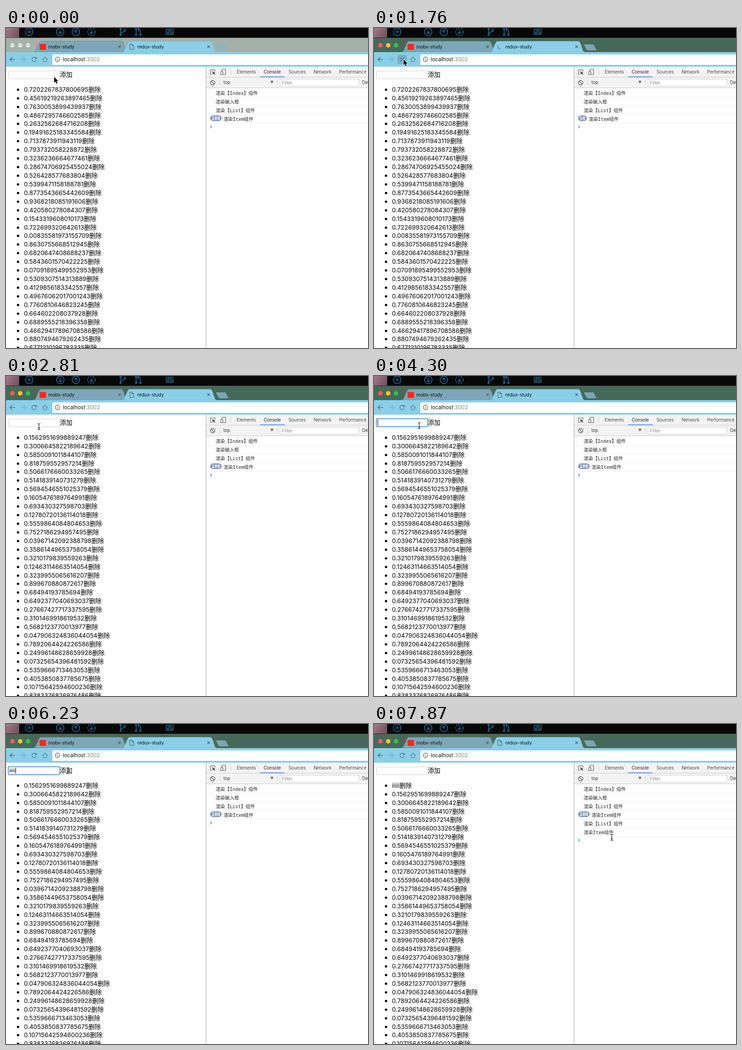
Write an HTML page with a canvas that moves like this. It is 797x703 px and loops after 8 s.

```html
<!DOCTYPE html>
<html lang="zh-CN">
<head>
<meta charset="utf-8">
<title>redux-study</title>
<style>
html, body { margin: 0; width: 100%; height: 100%; overflow: hidden; background: #fff; }
canvas { display: block; width: 797px; height: 703px; }
</style>
</head>
<body>
<canvas id="stage" width="797" height="703"></canvas>
<script>
const c = document.getElementById('stage').getContext('2d');
const LOOP = 8000, TICK = 146.5;
const ACTIVE = 570, PRESS = 1620, RELOAD = 1760, LOADED = 1910;
const FOCUS = 3260, TYPE = 4600, TYPED = 5190, ADD = 6530;
const CJK = '"Noto Sans CJK SC", "Noto Sans CJK", sans-serif';
const UI = 'Inter, ' + CJK;
const MONO = '"DejaVu Sans Mono", "Noto Sans CJK SC", "Noto Sans CJK", monospace';

// seeded stand-in for Math.random with full precision
function randomList(seed) {
  const word = () => {
    seed = seed + 0x6d2b79f5 | 0;
    let n = Math.imul(seed ^ seed >>> 15, seed | 1);
    n ^= n + Math.imul(n ^ n >>> 7, n | 61);
    return (n ^ n >>> 14) >>> 0;
  };
  return Array.from({ length: 31 }, () => String(word() / 2 ** 32 + word() / 2 ** 64));
}
const before = randomList(3), after = randomList(8);

// the pointer rests between legs; sag bends a leg downwards
const legs = [
  { at: 150, steps: 2, to: [95, 101] },
  { at: 870, steps: 4, to: [65, 69] },
  { at: 2360, steps: 4, to: [72, 111] },
  { at: 3550, steps: 2, to: [99, 109] },
  { at: 5640, steps: 5, to: [136, 102], sag: 10 },
  { at: 6680, steps: 3, to: [356, 178] },
  { at: 7270, steps: 5, to: [523, 249], sag: 33 }
];

// number of picture steps taken since a moment
const ticks = (t, from, max) => t < from ? 0 : Math.min(max, 1 + Math.floor((t - from) / TICK));
const during = (t, from, to) => t >= from && t < to;

function rect(x, y, w, h, color, r = 0) {
  c.beginPath();
  c.roundRect(x, y, w, h, r);
  c.fillStyle = color;
  c.fill();
}
function box(x, y, w, h, color, r = 0, width = 1) {
  c.beginPath();
  c.roundRect(x, y, w, h, r);
  c.strokeStyle = color;
  c.lineWidth = width;
  c.stroke();
}
function fill(d, color) {
  c.fillStyle = color;
  c.fill(new Path2D(d));
}
function stroke(d, color, width = 1.2) {
  c.strokeStyle = color;
  c.lineWidth = width;
  c.stroke(new Path2D(d));
}
function dot(x, y, r, color) {
  rect(x - r, y - r, 2 * r, 2 * r, color, r);
}
function ring(x, y, r, color, width = 1.2, from = 0, to = Math.PI * 2) {
  c.beginPath();
  c.arc(x, y, r, from, to);
  c.strokeStyle = color;
  c.lineWidth = width;
  c.stroke();
}
function cross(x, y, r, color, width) {
  stroke(`M${x - r} ${y - r}l${2 * r} ${2 * r}M${x + r} ${y - r}l${-2 * r} ${2 * r}`, color, width);
}
function text(s, x, y, size, color = '#000', family = UI, weight = 400) {
  c.font = `${weight} ${size}px ${family}`;
  c.fillStyle = color;
  c.fillText(s, x, y);
  return x + c.measureText(s).width;
}

function desktop() {
  const blue = '#1a8fd8', dim = '#2f6c8e';
  rect(0, 0, 797, 22, '#080808');
  const g = c.createLinearGradient(0, 0, 30, 20);
  g.addColorStop(0, '#a57b8b');
  g.addColorStop(1, '#6d4c58');
  rect(0, 0, 29, 21, g);

  ring(51, 8.5, 8.3, blue);
  stroke('M47 8.5h8M51 4.5v8', blue);
  ['down', 'up', 'fetch'].forEach((kind, i) => {
    const x = 119.5 + i * 34.3, dir = kind === 'up' ? -1 : 1;
    c.setLineDash(kind === 'fetch' ? [4, 2] : []);
    ring(x, 8.5, 8.3, blue);
    c.setLineDash([]);
    stroke(`M${x} ${8.5 - 4 * dir}v${8 * dir}m-3 ${-3 * dir}l3 ${3 * dir} 3 ${-3 * dir}`, blue);
  });
  for (const x of [252.5, 286.5]) {
    ring(x, 2, 1.8, blue);
    ring(x, 15, 1.8, blue);
    stroke(`M${x} 4v9`, blue);
  }
  stroke('M252.5 12c0-3 8-2 8-6M296 13V7q0-4-5-4M293 .5l-2.5 2.5 2.5 2.5', blue);
  ring(261.5, 5, 1.8, blue);
  ring(296, 15, 1.8, blue);
  rect(352, 2, 17, 13, '#12232e');
  box(352.5, 2.5, 16, 12, dim);
  for (let i = -1; i < 2; i++) ring(360.5 + 4 * i, i ? 11 : 6, 2, dim, 1);
}

function tab(x, right, color, edge) {
  const d = `M${x} 53C${x + 6} 53 ${x + 10} 29 ${x + 16} 29H${right - 12}C${right - 6} 29 ${right - 4} 53 ${right + 2} 53Z`;
  fill(d, color);
  stroke(d, edge, .6);
}

function tabs(t) {
  const active = t >= ACTIVE;
  rect(0, 21.5, 797, 32, active ? '#476959' : '#a2b2aa');
  ['#fc5753', '#fdbc2f', '#2ac840'].forEach((color, i) =>
    dot(14 + i * 17.2, 38, 5.1, active ? color : '#dce2df'));
  tab(61, 266, '#7da6b8', '#5a7d87');
  tab(256, 462, '#8acfe7', '#6d9dab');
  fill('M462 36h21l7 13h-21z', active ? '#7da6b3' : '#92b3bc');
  rect(0, 53, 797, 32, '#8acfe7');
  rect(74, 35, 14, 13, '#f5291b');
  text('mobx-study', 93, 45, 10.2, '#111');
  text('redux-study', 289, 45, 10.2, '#111');
  cross(250, 41, 2.7, '#40565f', 1.2);
  cross(446, 41, 2.7, '#33505b', 1.2);
  if (during(t, RELOAD, LOADED)) ring(278, 41, 5, '#3f7fd4', 1.7, 1.4, 3.6);
  else stroke('M272.5 35.5h5l3.5 3.5v8h-8.5zM277.5 35.5v3.5h3.5', '#3d525b', 1);
}

function toolbar(t) {
  const ink = '#557682';
  stroke('M20 69H9M14 63.5l-5.5 5.5 5.5 5.5', ink, 1.4);
  stroke('M32 69h11M38 63.5l5.5 5.5-5.5 5.5', '#74b5cc', 1.4);
  if (during(t, PRESS, LOADED)) rect(52, 59, 20, 20, '#76b0c4', 2);
  if (during(t, RELOAD, legs[2].at)) cross(62, 69, 4.6, ink, 1.4);
  else {
    ring(62, 69, 4.9, ink, 1.4, .3, 5.5);
    fill('M67.7 63v5h-5z', ink);
  }
  stroke('M80.5 69.5l5.5-5.5 5.5 5.5M82.5 68.5v5.5h7v-5.5', ink, 1.1);

  rect(102, 58, 710, 23, '#fff', 2);
  ring(113.5, 69, 5.1, '#555', 1.1);
  stroke('M113.5 66v1.2M113.5 68.2v4', '#555');
  const x = text('localhost', 125, 73, 11.6, '#111');
  text(':3002', x, 73, 11.6, '#808080');
}

function input(t) {
  if (!during(t, FOCUS, ADD)) {
    box(5.5, 94.5, 113, 17, '#d2d2d2');
    return;
  }
  box(5, 93.5, 113.5, 18, '#b9d9f8', 2.5, 3);
  box(5.5, 94, 112.5, 17, '#5b9fe8', 1, 1.6);
  const end = text('i'.repeat(ticks(t, TYPE, 5)), 7.5, 106, 10.8);
  const lastKey = t < TYPE ? FOCUS : Math.min(t, TYPED);
  if ((t - lastKey) % 1040 < 440) rect(Math.round(end + .3), 96, 1, 13, '#000');
}

function page(t) {
  rect(0, 85, 441, 618, '#fff');
  input(t);
  text('添加', 118.5, 107, 13.8, '#000', CJK);
  const items = t < LOADED ? before : t < ADD ? after : ['iiiii', ...after];
  items.forEach((s, i) => {
    const y = Math.round(139.8 + i * 18.92);
    dot(26.5, y - 4.5, 2.6, '#000');
    const x = text(s, 39.5, y, 13.4);
    text('删除', x, y, 13.8, '#000', CJK);
  });
}

function devtoolsBars() {
  const ink = '#5a5a5a', line = '#ccc';
  rect(441, 85, 356, 46, '#f3f3f3');
  rect(441, 107.5, 356, 1, line);
  rect(441, 131, 356, 1, line);

  stroke('M454 101.5h-3.5v-9.5h9.5v3.5', ink, 1.1);
  fill('M454 95l7 3-2.7 1 2.7 3-1 1-2.8-3-1.2 2.5z', '#444');
  box(475.5, 90.5, 8, 12, ink, 1, 1.2);
  rect(472, 95, 6, 8, '#f3f3f3');
  box(472.5, 95.5, 5, 7, ink, 1, 1.2);
  rect(494.5, 90, 1, 13, line);
  let x = 508;
  for (const name of ['Elements', 'Console', 'Sources', 'Network', 'Performance']) {
    const selected = name === 'Console';
    const end = text(name, x, 100, 9.8, selected ? '#222' : '#484848');
    if (selected) rect(x - 8, 106.5, end - x + 16, 1.7, '#4a8af4');
    x = end + 17;
  }

  ring(455, 120, 4.8, ink, 1.4);
  stroke('M451.6 116.6l6.8 6.8', ink, 1.4);
  rect(470.5, 113, 1, 13, line);
  text('top', 478.5, 123, 9.8, '#333');
  fill('M582 116h7l-3.5 6z', '#666');
  rect(597, 113, 1, 13, line);
  rect(603, 112, 174, 16, '#fff');
  box(603.5, 112.5, 173, 15, '#d0d0d0');
  text('Filter', 607.5, 123.5, 9.8, '#808080');
  text('Default levels', 784, 123, 9.8, '#333');
}

function devtools(t) {
  rect(441, 85, 356, 618, '#fff');
  rect(440, 85, 1, 618, '#a6a6a6');
  devtoolsBars();

  const list = '渲染【List】组件', item = '渲染Item组件';
  const rows = ['渲染【Index】组件', '渲染输入框', list, item];
  rows.push(...[list, item].slice(0, ticks(t, ADD, 2)));
  const count = during(t, RELOAD, LOADED) ? '58' : '100';
  let y = 147;
  rows.forEach((s, i) => {
    let x = 461.5;
    if (i === 3) {
      const w = count.length * 6.2 + 6.6;
      rect(449.5, y - 12, w, 12.5, '#8097bd', 6.2);
      text(count, 452.8, y - 2, 10.3, '#fff', MONO, 700);
      x = 449.5 + w + 4;
    }
    text(s, x, y, 10.3, '#252525', MONO);
    rect(441, y + 5, 356, 1, '#f0f0f0');
    y += 19;
  });
  stroke(`M449.5 ${y - 8.5}l3.3 3-3.3 3`, '#3f87f5', 1.4);
}

function pointerAt(t) {
  let x = 106, y = 107.5;
  for (const { at, steps, to, sag = 0 } of legs) {
    const p = ticks(t, at, steps) / steps;
    x += (to[0] - x) * p;
    y += (to[1] - y) * p + sag * Math.sin(Math.PI * p);
  }
  return [x, y];
}

function pointer(t) {
  const [x, y] = pointerAt(t);
  const overForm = x < 146 && y > 94 && y < 112 && t >= legs[1].at;
  const overLog = x > 462 && x < 528 && y > 132;
  c.save();
  c.translate(x, y);
  if (overForm || overLog) {
    const d = 'M-2.5-6.5Q.5-6.5 .5-4.5Q.5-6.5 3.5-6.5M.5-5V5M-2.5 6.5Q.5 6.5 .5 4.5Q.5 6.5 3.5 6.5M-1.5 2.5h4';
    stroke(d, 'rgba(255,255,255,.7)', 2.4);
    stroke(d, '#111', 1.1);
  } else {
    const d = 'M0 0v12.8l2.9-2.7 2.2 4.9 2-.9-2.1-4.8h4z';
    c.lineJoin = 'round';
    stroke(d, '#fff', 1.8);
    fill(d, '#000');
  }
  c.restore();
}

const start = performance.now();
function frame() {
  const t = (performance.now() - start) % LOOP;
  desktop();
  tabs(t);
  toolbar(t);
  page(t);
  devtools(t);
  pointer(t);
  requestAnimationFrame(frame);
}
frame();
</script>
</body>
</html>
```
